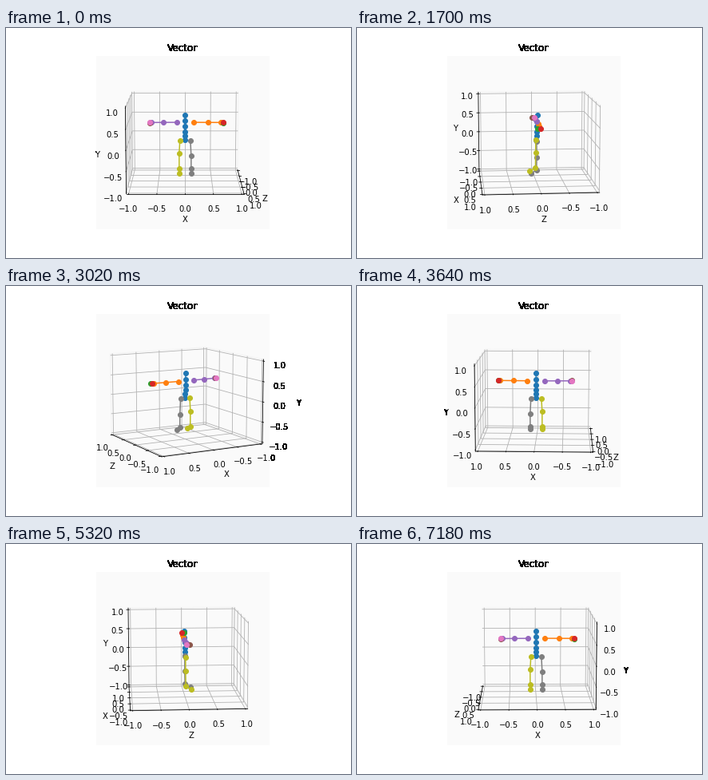
A matplotlib script for the animation above (7200 ms loop, 432 by 288 pixels).

```python
import numpy as np
import matplotlib.pyplot as plt
from matplotlib.animation import FuncAnimation

FRAMES, STEP_MS = 360, 20
LIMIT = 25 / 24          # unit cube plus a small margin
LEFT, RIGHT = 1, -1

plt.rcParams.update({
    "font.family": "DejaVu Sans",
    "font.size": 10,
    "figure.subplot.left": 0.125,
    "figure.subplot.right": 0.9,
    "figure.subplot.bottom": 0.125,
    "figure.subplot.top": 0.88,
})


# Joint chains are rows of (x, y, z), with y pointing up.

def spine(joints=6):
    """Joints spread out a little towards the head."""
    k = np.arange(joints)
    return np.column_stack([0 * k, 0.095 * k + 0.006 * k**2, -0.004 * k])


def arm(side, bone):
    """Shoulder to wrist, then the finger and the thumb as single joints."""
    t = np.array([0, 1, 1.95])
    limb = np.column_stack([side * (0.16 + bone * t), 0.44 + 0 * t, 0.01 * t - 0.03])
    finger = limb[-1:] + (side * 0.036, 0, 0.042)
    thumb = limb[-1:] + (side * 0.036, 0, -0.008)
    return [limb, finger, thumb]


def leg(side, knee):
    """Hip, knee, ankle and a toe that points forward."""
    hip, shin = side * 0.098, side * 0.112
    return np.array([(hip, -0.007, 0), (shin, knee, 0),
                     (shin, -0.73, 0.004), (shin, -0.815, 0.11)])


def harden(img, dpi):
    """Text outside the plot square is solid black, without soft edges."""
    out = np.round(img * 255).astype(np.uint8)
    h, w = out.shape[:2]
    box = ax.get_position()
    outside = np.ones((h, w), bool)
    outside[round((1 - box.y1) * h):round((1 - box.y0) * h),
            round(box.x0 * w):round(box.x1 * w)] = False
    out[outside & (out[..., :3].min(axis=2) < 250), :3] = 0
    return out, 0, 0


fig = plt.figure(figsize=(6, 4), dpi=72, facecolor="white")
fig.set_agg_filter(harden)
ax = fig.add_subplot(projection="3d", facecolor="#fafafa")
ax.set_title("Vector")

body = [spine(), *arm(LEFT, 0.26), *arm(RIGHT, 0.24),
        leg(LEFT, -0.40), leg(RIGHT, -0.345)]
for i, chain in enumerate(body):
    x, y, z = chain.T
    ax.plot(z, x, y, marker="o", color=f"C{i}")

ax.set(xlim=(-LIMIT, LIMIT), ylim=(-LIMIT, LIMIT), zlim=(-LIMIT, LIMIT),
       xlabel="Z", ylabel="X", zlabel="Y")
for axis in (ax.xaxis, ax.yaxis, ax.zaxis):
    axis.set_ticks(np.linspace(-1, 1, 5))
    axis.pane.set_fill(False)
    axis.pane.set_edgecolor("#ececec")


def update(i):
    # the tiny offset keeps wall choice stable at right angles
    ax.view_init(elev=10, azim=i * 360 / FRAMES + 1e-6)
    return ax.lines


anim = FuncAnimation(fig, update, frames=FRAMES, init_func=lambda: update(0),
                     interval=STEP_MS, repeat=True, repeat_delay=0, blit=False)
plt.show()
```
